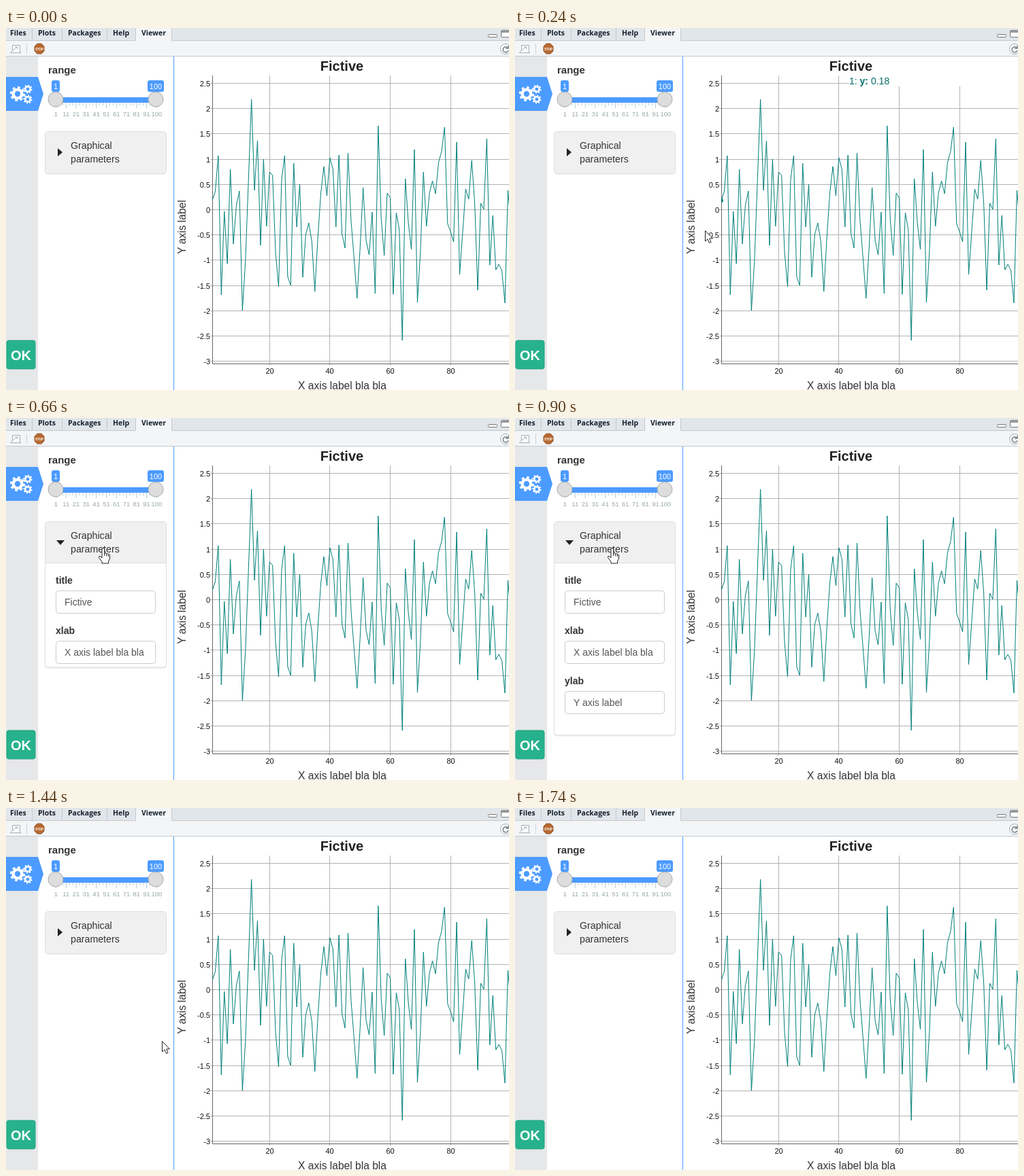
An HTML page that plays this animation: 739 by 533 pixels, repeating every 2.28 s.

```html
<!DOCTYPE html>
<html lang="en">
<head>
<meta charset="utf-8">
<style>
html, body { margin: 0; width: 100%; height: 100%; overflow: hidden; background: #fff; }
svg { display: block; font: 14px "Liberation Sans", Arial, sans-serif; fill: #333; }
.tabs { font: bold 10.5px "Open Sans", sans-serif; fill: #15202b; }
.b { font-weight: bold; }
.mid { text-anchor: middle; }
.blue { fill: #4c9bff; }
.line { fill: none; stroke: #008079; }
.tick { font-size: 11px; fill: #111; }
.field rect { fill: #fff; stroke: #ccc; }
.field .value { fill: #555; }
</style>
</head>
<body>
<svg id="stage" width="739" height="533" viewBox="0 0 739 533">
  <defs>
    <clipPath id="plotClip"><rect x="303" y="70" width="436" height="425"/></clipPath>
    <clipPath id="bodyClip"><rect id="bodyArea" x="57" y="214" width="179"/></clipPath>
    <filter id="shadow" x="-10%" y="-10%" width="120%" height="130%">
      <feDropShadow dx="0" dy="1" stdDeviation="0.7" flood-opacity=".12"/>
    </filter>
  </defs>

  <!-- window chrome -->
  <rect width="739" height="19" fill="#e1e6eb"/>
  <rect y="19" width="739" height="23" fill="#f3f5f7"/>
  <rect x="190" width="53" height="20" fill="#f3f5f7"/>
  <path d="M0 18.5H190.5V0M38.5 0V18M82.5 0V18M148.5 0V18M243.5 0V18.5H739M0 41.5H739" fill="none" stroke="#c3c9cf"/>
  <g class="tabs" id="tabs"></g>
  <g fill="#fff" stroke="#777">
    <rect x="708.5" y="9.5" width="13" height="4" rx="1"/>
    <rect x="727.5" y="3.5" width="14" height="10" rx="1"/>
    <path d="M728 5.5H739" stroke-width="2"/>
  </g>
  <g fill="#fff" stroke="#a3adb5">
    <path d="M9.5 25.5H20.5V36.5H6.5L9.5 33Z"/>
    <path d="M7 36.5H22M10 33L16 28M13 28H16.500V31" fill="none"/>
    <path d="M30.500 23V38" stroke="#cfd4d8"/>
    <circle cx="734" cy="31" r="7.500"/>
    <path d="M737 29A4 4 0 1 0 738 33M738 26V30H734" fill="none" stroke="#75818a" stroke-width="1.500"/>
  </g>
  <path d="M46 23H52L56 27V34L52 38H46L42 34V27Z" fill="#b8692f" stroke="#8e5a35"/>
  <text class="mid b" x="49" y="32.500" font-size="4.500" style="fill:#fff">STOP</text>

  <!-- side bar -->
  <rect y="42" width="47" height="491" fill="#e5e7e9"/>
  <path class="blue" d="M0 72H47L55 97L47 122H0Z"/>
  <g id="gears" fill="none" stroke="#fff"></g>
  <rect x="1" y="460" width="42" height="42" rx="3" fill="#27b28d" stroke="#1fa37f"/>
  <text class="mid b" x="22" y="489" font-size="20" style="fill:#fff">OK</text>
  <path d="M246.500 42V533" stroke="#4c9bff"/>

  <!-- range slider -->
  <text class="b" x="62" y="67" font-size="15">range</text>
  <rect class="blue" x="73" y="102" width="147" height="8"/>
  <g id="slider"></g>

  <!-- collapsible panel -->
  <rect id="panel" x="57.500" y="152.500" width="178" rx="4" fill="#fff" stroke="#ddd" filter="url(#shadow)"/>
  <path id="header" fill="#f0f0f0"/>
  <path id="divider" d="M58 213.500H235" stroke="#ddd"/>
  <path id="caret" fill="#222"/>
  <text x="95" y="178" font-size="14.200">Graphical</text>
  <text x="95" y="198" font-size="14.200">parameters</text>
  <g id="body" class="field" clip-path="url(#bodyClip)"></g>

  <!-- chart -->
  <g id="grid" stroke="#b3b3b3"></g>
  <path d="M303.500 70V494.500H739" fill="none" stroke="#666"/>
  <g id="ticks" class="tick"></g>
  <g clip-path="url(#plotClip)">
    <path id="curve" class="line"/>
    <circle id="dot" r="3" fill="#008079"/>
  </g>
  <text class="mid b" x="493.500" y="63" font-size="20" style="fill:#222">Fictive</text>
  <text class="mid" x="494" y="532" font-size="15.600">X axis label bla bla</text>
  <text class="mid" transform="translate(264 293) rotate(-90)" font-size="15.600">Y axis label</text>
  <g id="legend">
    <rect x="491" y="70" width="248" height="16" fill="#fff"/>
    <text x="491" y="83" style="fill:#006f69"><tspan id="legendX"></tspan> <tspan class="b">y:</tspan> <tspan id="legendY"></tspan></text>
  </g>

  <g id="cursor" fill="#fff" stroke="#222" stroke-linejoin="round">
    <path id="arrow" d="M.5 .5V16L4 12.800L6.500 18.500L9 17.400L6.600 11.900H11.500Z"/>
    <path id="hand" d="M-2 1.500Q-2 -.5 -.2 -.5T1.700 1.500V7.500Q3.500 6.300 4.800 8Q6.500 7 7.500 8.800Q9.500 8.300 9.500 10.500V15L7.500 19V22H-2V19.500L-6.500 13.500Q-7 11 -4.500 11.500L-2 14ZM1.700 7.500V11M4.800 8V11.500M7.500 9V12"/>
  </g>
</svg>
<script>
const $ = id => document.getElementById(id);
const put = (id, html) => $(id).insertAdjacentHTML('beforeend', html);
const set = (id, attrs) => { for (const k in attrs) $(id).setAttribute(k, attrs[k]); };
const show = (id, on) => { $(id).style.display = on ? '' : 'none'; };

// vertical positions of the 100 samples
const ys = [
  254, 241, 188, 393, 270, 347, 208, 318, 261, 240, 416, 344, 225, 105, 239, 166, 320, 193, 292, 212,
  217, 331, 381, 223, 188, 366, 379, 199, 293, 230, 367, 304, 287, 314, 388, 309, 243, 204, 247, 191,
  208, 293, 187, 303, 324, 184, 283, 339, 398, 324, 235, 313, 334, 271, 391, 144, 281, 335, 243, 250,
  392, 272, 297, 460, 222, 287, 326, 179, 404, 329, 212, 292, 243, 225, 244, 198, 182, 146, 288, 300,
  315, 168, 363, 301, 237, 252, 195, 258, 386, 258, 267, 163, 349, 276, 356, 348, 357, 405, 239, 290];
const STEP = 4.433, ZERO = 267.5, UNIT = 74.4;
const px = i => 303 + (i - 1) * STEP;

[['Files', 6], ['Plots', 47], ['Packages', 91], ['Help', 157], ['Viewer', 199]]
  .forEach(([s, x]) => put('tabs', `<text x="${x}" y="11">${s}</text>`));

for (const [x, y, r] of [[17, 97, 11], [32, 90, 6.5], [32, 105, 6.5]])
  put('gears', `<circle cx="${x}" cy="${y}" r="${r * .58}" stroke-width="${r * .4}"/>
    <circle cx="${x}" cy="${y}" r="${r * .87}" stroke-width="${r * .28}" pathLength="16" stroke-dasharray="1"/>`);

for (let i = 0; i <= 30; i++) {
  const x = 73.5 + i * 4.93, big = i % 3 === 0;
  put('slider', `<path d="M${x} 110V${big ? 118 : 114}" stroke="#b5cdd4"/>`);
  if (big) put('slider', `<text class="mid" x="${x}" y="130" font-size="9.500" style="fill:#98a8a8">${i < 30 ? i / 3 * 10 + 1 : 100}</text>`);
}
for (const [x, w, s] of [[73, 12, 1], [220, 24, 100]])
  put('slider', `<circle cx="${x}" cy="105" r="11" fill="#ddd" stroke="#a9a9a9"/>
    <rect class="blue" x="${x - w / 2}" y="77" width="${w}" height="17" rx="3"/>
    <text class="mid" x="${x}" y="89.500" font-size="11" style="fill:#fff">${s}</text>`);

[['title', 'Fictive'], ['xlab', 'X axis label bla bla'], ['ylab', 'Y axis label']].forEach(([label, value], i) => {
  const y = 244 + i * 74;
  put('body', `<text class="b" x="73" y="${y}">${label}</text>
    <rect x="73.500" y="${y + 10.5}" width="146" height="33" rx="4"/>
    <text class="value" x="86" y="${y + 32}">${value}</text>`);
});

for (let v = -3; v <= 2.5; v += .5) {
  const y = Math.floor(ZERO - v * UNIT) + .5;
  put('grid', `<path d="M300 ${y}H739"/>`);
  put('ticks', `<text x="300" y="${y + 4}" text-anchor="end">${v}</text>`);
}
for (let i = 20; i <= 80; i += 20) {
  const x = Math.floor(px(i)) + .5;
  put('grid', `<path d="M${x} 70V497"/>`);
  put('ticks', `<text class="mid" x="${x}" y="509">${i}</text>`);
}
set('curve', { d: 'M' + ys.map((y, i) => px(i + 1) + ' ' + y).join('L') });

// CSS "ease" curve, solved by bisection
function ease(p) {
  if (p <= 0 || p >= 1) return p <= 0 ? 0 : 1;
  let lo = 0, hi = 1, s = .5;
  const bez = (a, b) => 3 * (1 - s) ** 2 * s * a + 3 * (1 - s) * s * s * b + s ** 3;
  for (let n = 0; n < 20; n++) {
    s = (lo + hi) / 2;
    if (bez(.25, .25) < p) lo = s; else hi = s;
  }
  return bez(.1, 1);
}

const CLOSED = 214, OPEN = 467;
function panelBottom(t) {
  if (t < 600 || t >= 1440) return CLOSED;
  if (t < 900) return CLOSED + 283 * ease((t - 550) / 350);
  return OPEN - (OPEN - CLOSED) * ease((t - 1118) / 350);
}

// mouse path: time, x, y
const path = [[60, 540, 501], [240, 279, 298], [330, 194, 229], [420, 143, 192],
  [1260, 143, 192], [1440, 229, 343], [1620, 353, 480], [1680, 400, 496]];
function mouse(t) {
  const k = path.findIndex(p => p[0] >= t);
  if (k < 0 || t < path[0][0]) return null;
  const b = path[k], a = path[k - 1] || b;
  const f = (t - a[0]) / (b[0] - a[0] || 1);
  return [a[1] + (b[1] - a[1]) * f, a[2] + (b[2] - a[2]) * f];
}

function draw(t) {
  const bottom = panelBottom(t), open = bottom > CLOSED;
  set('panel', { height: bottom - 152.5 });
  set('bodyArea', { height: Math.max(0, bottom - CLOSED - 1) });
  set('header', { d: open
    ? 'M58 213V157Q58 153 62 153H231Q235 153 235 157V213Z'
    : 'M58 209V157Q58 153 62 153H231Q235 153 235 157V209Q235 213 231 213H62Q58 213 58 209Z' });
  show('divider', open);
  set('caret', { d: t >= 600 && t < 1140 ? 'M74 180H86L80 187Z' : 'M76 177L83 183L76 189Z' });

  const m = mouse(t);
  show('cursor', m);
  const hover = m && m[0] > 247;
  show('legend', hover);
  show('dot', hover);
  if (!m) return;
  const [x, y] = m.map(Math.round);
  const hand = x > 57 && x < 236 && y > 152 && y < CLOSED;
  set('cursor', { transform: `translate(${x} ${y})` });
  show('hand', hand);
  show('arrow', !hand);
  if (hover) {
    const i = Math.max(1, Math.min(100, Math.round(1 + (x - 303) / STEP)));
    set('dot', { cx: px(i), cy: ys[i - 1] });
    $('legendX').textContent = i + ':';
    $('legendY').textContent = +((ZERO - ys[i - 1]) / UNIT).toFixed(2);
  }
}

const start = performance.now();
function frame() {
  const t = (performance.now() - start) % 2280;
  draw(Math.floor(t / 60) * 60);
  requestAnimationFrame(frame);
}
frame();
</script>
</body>
</html>
```
